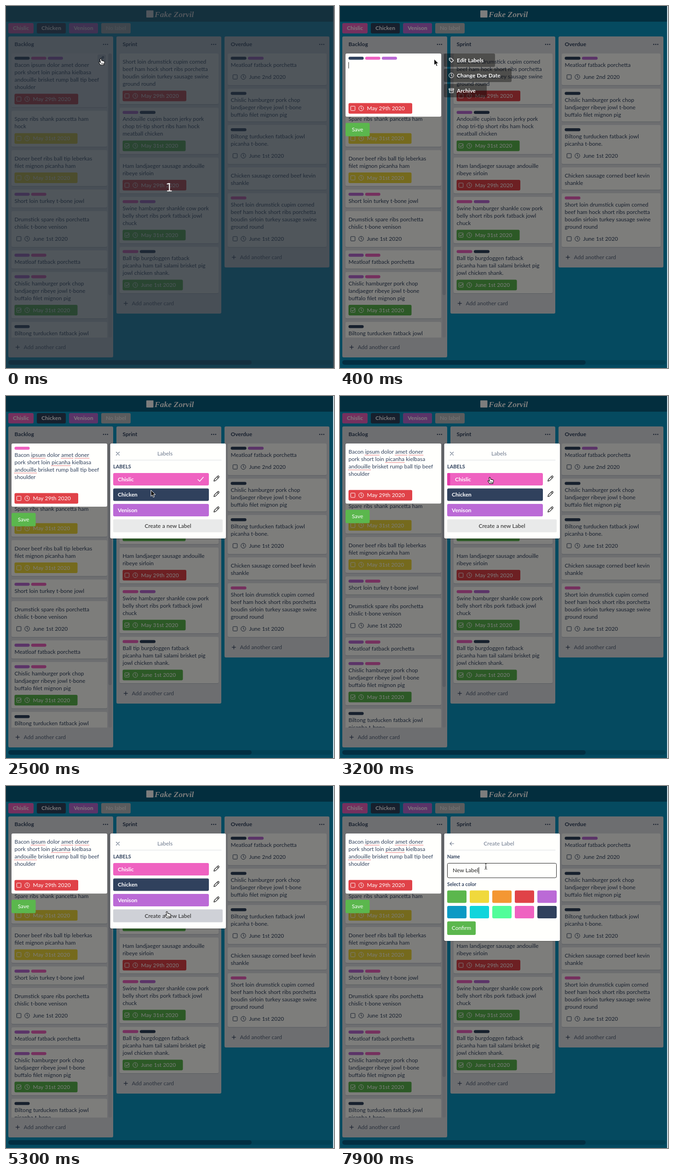
Recreate the animation shown at these times as an HTML page. Size 713 px wide and 785 px high, loop 8000 ms.

```html
<!DOCTYPE html>
<html lang="en">
<head>
<meta charset="utf-8">
<title>Task board</title>
<style>
html, body { margin: 0; width: 100%; height: 100%; overflow: hidden; background: #0a98c4; }
svg { display: block; width: 713px; height: 785px; }
text { font-family: Lato, "Open Sans", sans-serif; font-size: 12px; word-spacing: .3px; fill: #30415d; white-space: pre; }
.bold { font-weight: 700; }
.small { font-size: 10.5px; font-weight: 700; }
.mid { text-anchor: middle; }
.line { fill: none; stroke-linecap: round; stroke-linejoin: round; }
</style>
</head>
<body>
<svg id="stage" viewBox="0 0 713 785" xmlns="http://www.w3.org/2000/svg">
  <defs><clipPath id="list"><rect x="5" y="96" width="228" height="623"/></clipPath></defs>
  <g id="board"></g>
  <g id="modal"></g>
  <rect x="711" width="2" height="785" fill="#dbe7ef"/>
  <g id="countdown">
    <rect width="713" height="785" fill="#1a212a" opacity=".76"/>
    <text x="355" y="402" class="mid" style="font:24px 'DejaVu Sans',sans-serif;fill:#f4f4f4">1</text>
  </g>
  <g id="pointer"></g>
</svg>
<script>
const LOOP = 8000, STEP = 100;
const NAVY = '#30415d', PINK = '#ef62c1', VIOLET = '#bb6ad6';
const RED = '#e04248', YELLOW = '#f0d93c', GREEN = '#5bb74d';
const LABELS = {
  p: { name: 'Chislic', color: PINK, edge: '#e23aa9' },
  k: { name: 'Chicken', color: NAVY, edge: '#202e45' },
  v: { name: 'Venison', color: VIOLET, edge: '#a345c4' }
};
const NO_LABEL_SHIFT = 6.8;
const $ = id => document.getElementById(id);

// Drawing helpers; text is placed by its vertical centre.
const rect = (x, y, w, h, fill, r = 3, extra = '') =>
  `<rect x="${x}" y="${y}" width="${w}" height="${h}" rx="${r}" fill="${fill}" ${extra}/>`;
const text = (x, cy, s, cls = '', fill = NAVY) =>
  `<text x="${x}" y="${cy + 4.2}" class="${cls}" style="fill:${fill}">${s}</text>`;
const line = (d, color, width = 1.1, extra = '') =>
  `<path class="line" d="${d}" stroke="${color}" stroke-width="${width}" ${extra}/>`;
const at = (x, y, inner) => `<g transform="translate(${x} ${y})">${inner}</g>`;

const clock = (x, y, c) => at(x, y, `<circle r="5.2" fill="none" stroke="${c}"/>` + line('M0-3V0.3L2 1.4', c, 1));
const pencil = (x, y, c, s = 1) =>
  at(x, y, line('M-5.5 5.5L-4.6 2L2.8-5.4Q4-6.2 5-5.2Q6.2-4 5.4-2.8L-2 4.6ZM1.3-3.9L3.9-1.3', c, 1.3, `transform="scale(${s})"`));
const plus = (x, y) => line(`M${x - 4} ${y}h8M${x} ${y - 4}v8`, NAVY, 1.2);

const ruler = document.createElement('canvas').getContext('2d');
ruler.font = '12px Lato, "Open Sans", sans-serif';
ruler.wordSpacing = '.3px';
const textWidth = s => ruler.measureText(s).width;

function pills(x, y, keys, scale = 1) {
  return [...keys].map((k, i) =>
    rect(x + i * 36.2 * scale, y, 33 * scale, 6.6, LABELS[k].color, 3.3)).join('');
}

function badge(x, cy, date, color, done) {
  const widths = { 'May 29th 2020': 138.5, 'May 31st 2020': 137, 'June 1st 2020': 131 };
  const ink = color ? '#fff' : NAVY;
  return (color ? rect(x, cy - 11.5, widths[date], 23, color) : '') +
    rect(x + 4.8, cy - 4.7, 9.4, 9.4, 'none', 1, `stroke="${ink}"`) +
    (done ? line(`M${x + 7} ${cy}l2 2l4.5-4.5`, ink) : '') +
    clock(x + 27.5, cy, ink) + text(x + 40, cy, date, '', ink);
}

const paragraph = (x, cy, lines) => lines.map((s, i) => text(x, cy + 16 * i, s)).join('');

// Stacks cards from the top of a column; each card is [labels, text, date, colour, done].
function stack(x, w, cards) {
  let y = 103;
  return cards.map(([keys, words, date, color, done]) => {
    const lines = words.split('|');
    const first = y + (keys ? 24.8 : 18);
    const last = first + 16 * (lines.length - 1);
    const bottom = date ? last + 44 : last + 14.5;
    const out = rect(x, y + 1, w, bottom - y, '#b5bbc6') + rect(x, y, w, bottom - y, '#fffffc') +
      pills(x + 6.5, y + 7, keys, w / 208) + paragraph(x + 6.5, first, lines) +
      (date ? badge(x + 6.5, last + 26, date, color, done) : '');
    y = bottom + 7.4;
    return out;
  });
}

function column(x, bottom, title) {
  return rect(x, 66, 228, bottom - 66, '#dfe1e6', 3) + text(x + 13.5, 83, title, 'bold') +
    [0, 4.4, 8.8].map(d => `<circle cx="${x + 207 + d}" cy="83.3" r="1.2" fill="${NAVY}"/>`).join('') +
    plus(x + 20.3, bottom - 22.2) + text(x + 33.5, bottom - 21.8, 'Add another card', '', '#56647b');
}

const D29 = 'May 29th 2020', D31 = 'May 31st 2020', J1 = 'June 1st 2020';
const BACON = 'Bacon ipsum dolor amet doner|pork short loin picanha kielbasa|andouille brisket rump ball tip beef|shoulder';
const DRUM = 'Short loin drumstick cupim corned|beef ham hock short ribs porchetta|boudin sirloin turkey sausage swine|ground round';
const CHOP = 'Chislic hamburger pork chop|landjaeger ribeye jowl t-bone|buffalo filet mignon pig';
const TURDUCKEN = 'Biltong turducken fatback jowl|picanha t-bone.';

const backlog = [
  ['kpv', BACON, D29, RED],
  ['', 'Spare ribs shank pancetta ham|hock', D31, YELLOW],
  ['', 'Doner beef ribs ball tip leberkas|filet mignon picanha ham', D31, YELLOW],
  ['vp', 'Short loin turkey t-bone jowl'],
  ['', 'Drumstick spare ribs porchetta|chislic t-bone venison', J1],
  ['vp', 'Meatloaf fatback porchetta'],
  ['vp', CHOP, D31, GREEN, 1],
  ['k', TURDUCKEN, J1]
];
const sprint = [
  ['', DRUM, D29, RED],
  ['vk', 'Andouille cupim bacon jerky pork|chop tri-tip short ribs ham hock|meatball chicken', D31, GREEN, 1],
  ['', 'Ham landjaeger sausage andouille|ribeye sirloin', D29, RED],
  ['pv', 'Swine hamburger shankle cow pork|belly short ribs pork fatback jowl|chuck', D31, GREEN, 1],
  ['pk', 'Ball tip burgdoggen fatback|picanha ham tail salami brisket pig|jowl chicken shank.', J1, GREEN, 1]
];
const overdue = [
  ['kv', 'Meatloaf fatback porchetta', 'June 2nd 2020'],
  ['k', CHOP],
  ['k', TURDUCKEN, J1],
  ['', 'Chicken sausage corned beef kevin|shankle'],
  ['p', DRUM, J1]
];

function buildBoard() {
  const [firstCard, ...rest] = stack(12, 208, backlog);
  const chips = [['p', 5, 55], ['k', 67, 63], ['v', 137, 63]].map(([k, x, w]) =>
    rect(x, 37, w, 22.5, LABELS[k].color) + text(x + w / 2, 48, LABELS[k].name, 'bold mid', '#fff')).join('');
  $('board').innerHTML = rect(0, 0, 713, 785, '#0a98c4', 0) + rect(0, 0, 713, 34, '#065f7e', 0) +
    rect(305, 9.5, 15.5, 15.5, '#fff', 1) +
    `<text x="323" y="24" style="font:italic 700 17.5px 'Liberation Serif',serif;fill:#fff">Fake Zorvil</text>` +
    chips + rect(207, 37, 64, 22.5, '#b9bdc0') + text(239, 48, 'No label', 'mid', '#f2f2f2') +
    column(5, 762, 'Backlog') + column(240, 667, 'Sprint') + column(475, 567, 'Overdue') +
    `<g clip-path="url(#list)">${firstCard}<g id="rest">${rest.join('')}</g></g>` +
    rect(222.5, 103, 7.5, 616, '#d3d6dc', 3.7) +
    `<rect id="thumb" x="222.5" y="103" width="7.5" height="524" rx="3.7" fill="#bcc1ca"/>` +
    stack(247, 215, sprint).join('') + stack(482, 215, overdue).join('') +
    rect(5, 768, 703, 10, '#0786ae', 5) + rect(5, 768, 529, 10, '#075e86', 5) +
    `<g id="hover">${rect(12, 103, 208, 117, '#0b1f4b', 3, 'opacity=".08"')}${rect(199, 105, 18, 18, '#c9cdd6')}${pencil(208, 114, NAVY, .8)}</g>`;
}

// Dotted underlines below words the spell checker does not know.
function spelling(x, cy, lines) {
  return lines.map((s, i) => ['ipsum', 'amet', 'doner', 'picanha', 'andouille']
    .filter(word => s.includes(word))
    .map(word => line(`M${x + textWidth(s.slice(0, s.indexOf(word)))} ${cy + 16 * i + 7}h${textWidth(word)}`,
      '#e0474c', 1.5, 'stroke-dasharray=".1 2.4"')).join('')).join('');
}

const baconLines = BACON.split('|');
const baconText = paragraph(18.5, 128, baconLines) + spelling(18.5, 128, baconLines);

function editor(t, labels) {
  const up = labels ? 0 : NO_LABEL_SHIFT;
  return rect(12, 103, 208, 137 - up, '#fffffd') + pills(18.5, 110, labels) +
    at(0, -up, (t < 500 ? line('M18.8 122v13', '#222', 1) : baconText) +
      badge(18.5, 222, D29, RED) + rect(12, 253.5, 52.5, 29, GREEN) + text(38, 268, 'Save', 'mid', '#fff'));
}

function menu(hover) {
  const tag = line('M-4.5-4.5h4.2L4.7 0.5L0.5 4.7L-4.5-0.3Z', '#fff', 1.2) + '<circle cx="-2.3" cy="-2.3" r=".8" fill="#fff"/>';
  const box = line('M-5-4.5h10v2.6h-10ZM-4-1.9V4.5H4V-1.9M-1.5 .5h3', '#fff', 1.2);
  const items = [['Edit Labels', 111, at(242, 117.5, tag)], ['Change Due Date', 147, clock(242, 150.5, '#fff')],
    ['Archive', 93, at(242, 183.5, box)]];
  return items.map(([name, w, icon], i) => at(hover && !i ? 5 : 0, 0,
    rect(226, 103 + 33 * i, w, 29, '#000', 3, 'opacity=".38"') + icon + text(254, 117.7 + 32.8 * i, name, 'bold', '#fff'))).join('');
}

const popup = (height, title, icon) =>
  rect(226, 104.5, 252, height, '#000', 3, 'opacity=".2"') + rect(226.5, 103, 251.5, height, '#fffffd') +
  line(icon, '#6b778c', 1.1) + text(345.5, 124.5, title, 'mid', '#6b778c') + line('M236 139h232', '#d9dce2', 1);

function labelPopup(labels, hand) {
  const over = (y, h) => hand && hand.y >= y && hand.y < y + h;
  const rows = [...'pkv'].map((key, i) => {
    const { name, color, edge } = LABELS[key], y = 167 + 33.5 * i, on = over(y, 27);
    return rect(233, y, 208, 27, color) + (on ? rect(233, y, 6.5, 27, edge, 2) : '') +
      text(on ? 250 : 243, y + 13.5, name, 'bold', '#fff') +
      (labels.includes(key) ? line(`M417 ${y + 14}l4 4l8-9`, '#fff', 1.5) : '') + pencil(457.5, y + 12, '#222');
  }).join('');
  return popup(206, 'Labels', 'M239.5 121.5l7 7m0-7l-7 7') +
    `<text x="233" y="157.3" class="bold" style="font-size:11px">LABELS</text>` + rows +
    rect(233, 267.5, 238, 28, over(267, 29) ? '#cfd1d7' : '#e9eaea', 2) + text(352, 281.5, 'Create a new Label', 'mid', '#222');
}

const KEY_TIMES = [6600, 6700, 6800, 6900, 7200, 7300, 7500, 7500, 7600];
function createPopup(t) {
  const typed = 'New Label'.slice(0, KEY_TIMES.filter(k => k <= t).length);
  const caret = t >= 6500 && (t < 7600 || t >= 7900);
  const swatches = [GREEN, YELLOW, '#f49733', RED, VIOLET, '#0b9ac4', '#10d5dc', '#52fd9a', PINK, NAVY];
  return popup(233, 'Create Label', 'M247.5 125h-8.5m3.7-3.7l-3.7 3.7l3.7 3.7') +
    text(233, 153.2, 'Name', 'small') +
    rect(233.5, 167.5, 237, 31.5, '#fffffd', 3, `stroke="${t < 6100 ? '#8b93a0' : '#222'}"`) +
    text(245, 183.1, typed, '', '#222') +
    (caret ? line(`M${245.8 + textWidth(typed)} 176.5v13.5`, '#111', 1) : '') +
    text(233, 212.7, 'Select a color', 'small') +
    swatches.map((c, i) => rect(233 + 49 * (i % 5), i < 5 ? 226.5 : 260, 42, 27, c)).join('') +
    rect(233, 293.5, 62, 29.5, GREEN) + text(264, 308, 'Confirm', 'mid', '#fff');
}

const LABEL_STATES = [[0, 'kpv'], [2200, 'kp'], [2400, 'p'], [3000, ''], [3600, 'k'], [4300, 'kp'], [4500, 'k'], [4900, '']];
const labelsAt = t => LABEL_STATES.filter(([start]) => start <= t).pop()[1];

// Pointer path: time, hot spot, shape used from that time on.
const PATH = [
  [0, 206, 114, 'hand'], [300, 206, 114, 'hand'], [400, 204.5, 115, 'arrow'], [600, 204.5, 115, 'arrow'],
  [800, 272, 114, 'hand'], [1000, 291, 114, 'arrow'], [1200, 294, 117, 'arrow'], [1500, 295, 118, 'arrow'],
  [1900, 328, 240, 'hand'], [2200, 326, 238, 'hand'], [2400, 317, 207, 'hand'], [2500, 315, 204, 'arrow'],
  [2700, 322, 178, 'hand'], [3300, 326, 176, 'hand'], [3500, 328, 206, 'hand'], [3800, 328, 206, 'hand'],
  [4100, 332, 174, 'hand'], [4500, 332, 174, 'hand'], [4700, 335, 207, 'hand'], [4900, 336, 208, 'hand'],
  [5300, 350, 272, 'hand'], [5500, 350, 272, 'hand'], [5800, 334, 215, 'arrow'], [6100, 317, 174, 'beam'], [LOOP, 317, 174, 'beam']
];
function pointerAt(t) {
  const i = PATH.findIndex(p => p[0] > t) - 1;
  const [t0, x0, y0, shape] = PATH[i], [t1, x1, y1] = PATH[i + 1];
  const u = (t - t0) / (t1 - t0), e = u * u * (3 - 2 * u);
  return { x: x0 + (x1 - x0) * e, y: y0 + (y1 - y0) * e, shape };
}
const SHAPES = {
  arrow: '<path d="M0 0V13.5L3.1 10.6L5.2 15.6L7.6 14.6L5.5 9.8H9.8Z" fill="#111" stroke="#fff" stroke-width="1"/>',
  hand: '<path d="M-1.7 1.2Q-.3-.7 1 1L2 4.8Q3.3 4 4.1 5.2Q5.5 4.6 6.1 5.8Q8 5.5 8.2 7.3Q8.3 10 6.6 12V14H-.6Q-1.6 11.5-4.2 8.8Q-4.6 7 -2.4 7.4L-.6 8.8Z" fill="#fff" stroke="#111" stroke-width="1.1"/>' +
    line('M1.6 9.5v3M3.4 9.5v3M5.2 9.5v3', '#111', .7),
  beam: line('M-2.5-6.5Q0-6.5 0-5V5Q0 6.5-2.5 6.5M2.5-6.5Q0-6.5 0-5M0 5Q0 6.5 2.5 6.5M-1.5 2h3', '#222', 1)
};

function render(t) {
  const labels = labelsAt(t), pointer = pointerAt(t);
  const hand = pointer.shape === 'hand' && pointer;
  const show = (id, on) => $(id).setAttribute('visibility', on ? 'visible' : 'hidden');
  show('countdown', t < 100);
  show('hover', t < 300);
  $('rest').setAttribute('transform', `translate(0 ${labels ? 0 : -NO_LABEL_SHIFT})`);
  $('thumb').setAttribute('height', labels ? 524 : 528);
  const panel = t < 1000 ? menu(hand) : t < 5400 ? labelPopup(labels, hand) : createPopup(t);
  $('modal').setAttribute('opacity', t < 400 ? .6 : 1);
  $('modal').innerHTML = t < 300 ? '' : rect(0, 0, 711, 785, '#000', 0, 'opacity=".51"') + editor(t, labels) + panel;
  $('pointer').innerHTML = at(pointer.x, pointer.y, SHAPES[pointer.shape]);
}

buildBoard();
const start = performance.now();
let shown = -1;
function tick() {
  const t = Math.floor((performance.now() - start) % LOOP / STEP) * STEP;
  if (t !== shown) render(shown = t);
  requestAnimationFrame(tick);
}
tick();
</script>
</body>
</html>
```
